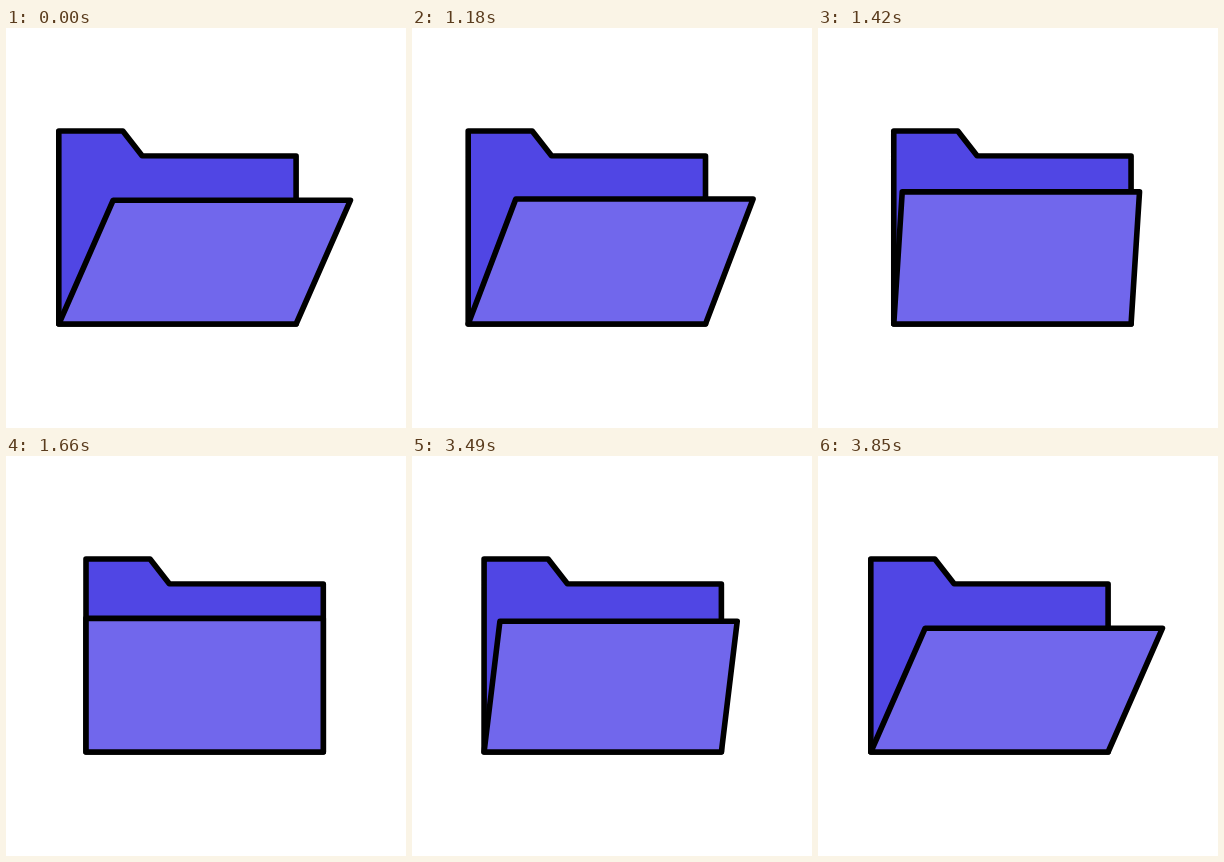
An HTML page for the animation above (3.88 s loop, 400 px wide and 400 px high).

```html
<!DOCTYPE html>
<html lang="en">
<head>
<meta charset="utf-8">
<title>Folder</title>
<style>
  html, body { margin: 0; width: 100%; height: 100%; overflow: hidden; background: #fff; }
  svg { display: block; width: 100%; height: 100%; }
  polygon { stroke: #000; stroke-width: 5.6; stroke-linejoin: round; }
</style>
</head>
<body>
<svg viewBox="0 0 400 400">
  <polygon id="back" fill="#5046e4" points="80,103 144,103 163.3,127.8 317.3,128 317.3,296 80,296"/>
  <polygon id="front" fill="#7167ec"/>
</svg>
<script>
const LOOP = 3880, STEP = 30, OFFSET = 10;
const CLOSE_START = 1000, OPEN_START = 3190, DURATION = 660;
const SWING = 27.2, DROP = 9.8;
const back = document.getElementById('back');
const front = document.getElementById('front');

const bezier = (a, b, u) => 3 * a * u * (1 - u) ** 2 + 3 * b * u * u * (1 - u) + u ** 3;

// Cubic-bezier(.56, 0, .32, 1), solved by bisection.
function ease(x) {
  if (x <= 0) return 0;
  if (x >= 1) return 1;
  let low = 0, high = 1;
  for (let i = 0; i < 24; i++) {
    const mid = (low + high) / 2;
    if (bezier(0.56, 0.32, mid) < x) low = mid; else high = mid;
  }
  return bezier(0, 1, low);
}

// The opening is the closing played backwards.
function openness(time) {
  return time < OPEN_START
    ? 1 - ease((time - CLOSE_START) / DURATION)
    : 1 - ease(1 - (time - OPEN_START) / DURATION);
}

function draw(now) {
  const time = Math.floor((now % LOOP - OFFSET) / STEP) * STEP + OFFSET;
  const open = openness(time);
  const shift = SWING * open;
  const top = 162.4 + DROP * open;
  back.setAttribute('transform', `translate(${-shift})`);
  front.setAttribute('points', [
    [80 + shift, top], [317.3 + shift, top],
    [317.3 - shift, 296], [80 - shift, 296]
  ].join(' '));
}

const start = performance.now();
function frame() {
  draw(performance.now() - start);
  requestAnimationFrame(frame);
}
frame();
</script>
</body>
</html>
```
